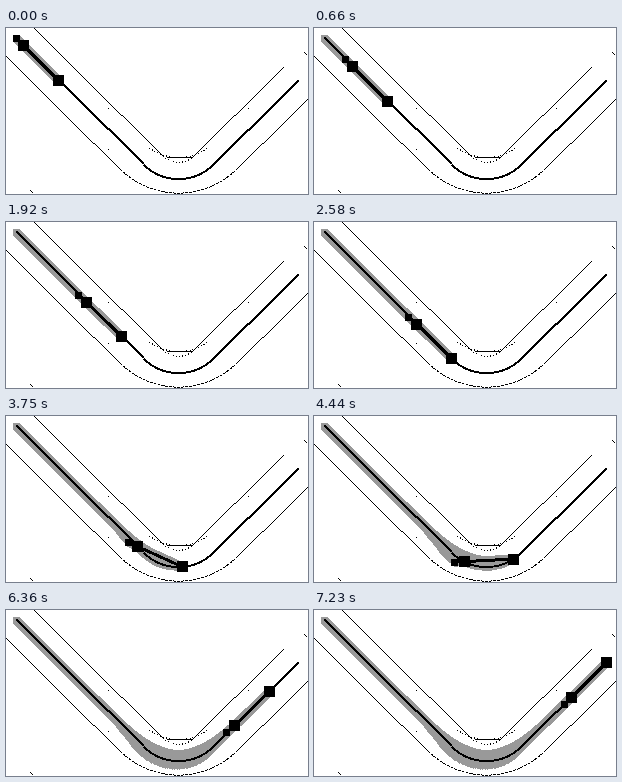
Recreate the animation shown at these times as an HTML page. Size 302 by 166 pixels, loop 7260 ms.

```html
<!DOCTYPE html>
<html>
<head>
<meta charset="utf-8">
<title>Swept path on a bend</title>
<style>
  html, body { margin: 0; width: 100%; height: 100%; overflow: hidden; background: #fff; }
  svg { display: block; width: 302px; height: 166px; }
</style>
</head>
<body>
<svg viewBox="0 0 302 166" shape-rendering="crispEdges">
  <g transform="translate(.5 .5)" fill="none" stroke="#000">
    <path id="swept" fill="#999" stroke="none"/>
    <g id="road" stroke-width="1"/>
    <path id="track" stroke-width="2"/>
    <path id="body" stroke-width="3"/>
    <path id="axles" fill="#000" stroke="none"/>
  </g>
</svg>
<script>
const LOOP = 7260, STEP = 30, LAST = 240;
const START = 10, END = 292, AXIS = 172, RADIUS = 49.4;
// Within CURVE of the axis the road sits RISE higher than its approaches.
const CURVE = 70, RISE = 1;
const WHEELBASE = 35 * Math.SQRT2, OVERHANG = 7 * Math.SQRT2, HALF_WIDTH = 4.5;
const el = id => document.getElementById(id);
const set = (id, d) => el(id).setAttribute('d', d);

const reach = r => r * Math.SQRT1_2;
const centreY = AXIS - RISE - RADIUS * Math.SQRT2;
function pathY(x) {
  const dx = Math.abs(x - AXIS);
  if (dx > CURVE) return AXIS - dx;
  if (dx > reach(RADIUS)) return AXIS - RISE - dx;
  return centreY + Math.sqrt(RADIUS ** 2 - dx ** 2);
}

function vehicle(step) {
  const fx = START + 42 + step, fy = pathY(fx);
  let lo = fx - 60, hi = fx;
  for (let i = 0; i < 30; i++) {
    const x = (lo + hi) / 2;
    if (Math.hypot(fx - x, fy - pathY(x)) > WHEELBASE) lo = x; else hi = x;
  }
  const mx = hi, my = pathY(mx);
  const ux = (fx - mx) / WHEELBASE, uy = (fy - my) / WHEELBASE;
  return { fx, fy, mx, my, ux, uy, rx: mx - ux * OVERHANG, ry: my - uy * OVERHANG };
}

function footprint({ fx, fy, rx, ry, ux, uy }) {
  const nx = -uy * HALF_WIDTH, ny = ux * HALF_WIDTH;
  return `M${rx + nx} ${ry + ny}L${rx - nx} ${ry - ny}L${fx - nx} ${fy - ny}L${fx + nx} ${fy + ny}Z`;
}

function square(x, y, size) {
  const h = size / 2;
  return `M${Math.round(x) - h} ${Math.round(y) - h}h${size}v${size}h${-size}Z`;
}

// Two 45° straights aimed at (AXIS, apex), raised within `curve` and joined by an arc.
function bend(apex, r, x0, x1, curve, leftShift = 0) {
  const k = reach(r), top = apex - RISE;
  const straight = (from, to, peak, shift) =>
    `M${from} ${peak - Math.abs(from - AXIS) - shift}L${to} ${peak - Math.abs(to - AXIS) - shift}`;
  return {
    straights: straight(x0, AXIS - curve, apex, leftShift) +
      straight(AXIS - curve, AXIS - k, top, leftShift) +
      straight(AXIS + k, AXIS + curve, top, 0) +
      straight(AXIS + curve, x1, apex, 0),
    arc: `M${AXIS - k} ${top - k}A${r} ${r} 0 0 0 ${AXIS + k} ${top - k}`
  };
}

function drawRoad() {
  const outer = bend(AXIS + 28, 83, -5, 307, CURVE + 14);
  const inner = bend(AXIS - 28, 22, 20, 277, CURVE - 14);
  const line = (d, dash) => `<path d="${d}" stroke-dasharray="${dash || 'none'}"/>`;
  const dot = (x, y) => `M${x - .5} ${y}h1`;
  el('road').innerHTML =
    line(outer.straights + inner.straights) +
    line(outer.arc, '3 1') + line(inner.arc, '1 2') +
    line('M143 119.5A49 49 0 0 0 201 119.5', '1 2') +
    line('M160 129H186M24 162L27 165M298 24L301 27') +
    line(dot(102, 80) + dot(102, 121) + dot(242, 80));
  const track = bend(AXIS, RADIUS, START, END, CURVE, 1);
  set('track', track.straights + track.arc);
}

const poses = Array.from({ length: LAST + 1 }, (_, i) => vehicle(i));
const prints = poses.map(footprint);
let shown = -1;

function render(time) {
  const step = Math.min(LAST, Math.max(0, Math.floor((time % LOOP) / STEP) - 1));
  if (step === shown) return;
  shown = step;
  const p = poses[step];
  set('swept', square(START, START, 7) + prints.slice(0, step + 1).join(''));
  set('body', `M${p.rx} ${p.ry}L${p.fx} ${p.fy}`);
  set('axles', square(p.rx, p.ry, 7) + square(p.mx, p.my, 11) + square(p.fx, p.fy, 11));
}

drawRoad();
render(0);
const began = performance.now();
function tick() {
  render(performance.now() - began);
  requestAnimationFrame(tick);
}
requestAnimationFrame(tick);
</script>
</body>
</html>
```
